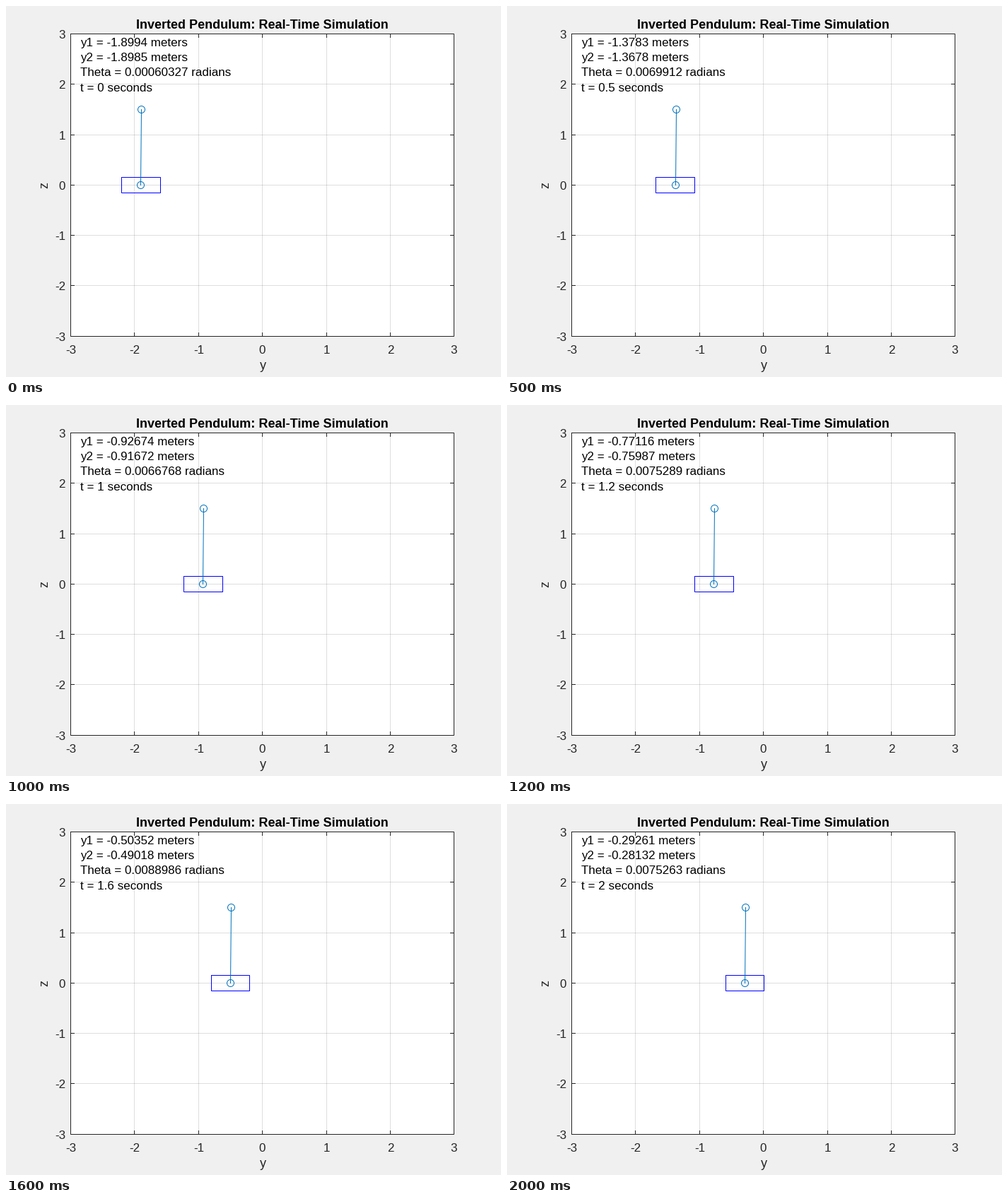
Animation, 700 px wide and 525 px high, one loop 2.1 s. Source, as a matplotlib script:

```python
import numpy as np
import matplotlib.pyplot as plt
from matplotlib.animation import FuncAnimation
from matplotlib.patches import Circle, Rectangle

W, H, DPI = 700, 525, 100
PX = 72 / DPI  # points per pixel
INK, BLUE = "#262626", "#0072BD"
FRAMES, DT = 21, 0.1
ROD = 1.5

# Sampled cart position and rod angle
T_CART = np.array([0, 0.3, 0.7, 1.0, 1.4, 1.8, 2.0])
CART = np.array([-1.8994, -1.5813, -1.1864, -0.92674,
                 -0.62991, -0.39129, -0.29261])
T_ANG = np.array([0, 0.1, 0.3, 0.7, 1.0, 1.4, 1.8, 2.0])
ANG = np.array([0.00060327, -0.00047218, 0.0047389, 0.0074275,
                0.0066768, 0.0085653, 0.0086265, 0.0075263])


def hermite(t, ts, vs):
    """Smooth curve through the samples."""
    slope = np.gradient(vs, ts)
    i = min(np.searchsorted(ts, t + 1e-9, side="right") - 1, len(ts) - 2)
    h = ts[i + 1] - ts[i]
    u = (t - ts[i]) / h
    a = u * u * (3 - 2 * u)
    return (vs[i] * (1 - a) + vs[i + 1] * a
            + h * u * (1 - u) * ((1 - u) * slope[i] - u * slope[i + 1]))


def sx(y):
    return np.rint(362.2 + 90.4167 * y) + 0.5


def sy(z):
    return np.rint(252.95 - 71.25 * z) + 0.5


fig = plt.figure(figsize=(W / DPI, H / DPI), dpi=DPI, facecolor="#f0f0f0")
ax = fig.add_axes([0, 0, 1, 1])
ax.set(xlim=(0, W), ylim=(H, 0))
ax.axis("off")


def line(xs, ys, color=INK, z=2, **kw):
    return ax.plot(xs, ys, color=color, lw=PX, zorder=z, snap=False, **kw)[0]


def label(x, y, s, size=17, color=INK, ha="center", **kw):
    kw.setdefault("va", "baseline")
    return ax.text(x, y, s, fontsize=size * PX, color=color, ha=ha,
                   family="Liberation Sans", zorder=5, **kw)


L, R, T, B = sx(-3), sx(3), sy(3), sy(-3)
ax.add_patch(Rectangle((L, T), R - L, B - T, fc="white", ec="none", zorder=0))
for v in range(-3, 4):
    x, y = sx(v), sy(v)
    if abs(v) < 3:
        line([x, x], [T, B], alpha=0.15, z=1)
        line([L, R], [y, y], alpha=0.15, z=1)
        for edge, d in ((T, 5.5), (B, -5.5)):
            line([x, x], [edge, edge + d], solid_capstyle="butt")
        for edge, d in ((L, 5.5), (R, -5.5)):
            line([edge, edge + d], [y, y], solid_capstyle="butt")
    label(x, 492, str(v))
    label(84, y + 6.5, str(v), ha="right")
line([L, R, R, L, L], [T, T, B, B, T], solid_joinstyle="miter")

label(362.5, 32, "Inverted Pendulum: Real-Time Simulation", 18, "black",
      weight="bold")
label(363.5, 514, "y", 18)
label(55, 253.5, "z", 18, rotation=90, va="center")

cart = line([], [], "#0000ff", 3, solid_joinstyle="miter")
rod = line([], [], BLUE, 4)
joints = [ax.add_patch(Circle((0, 0), 5, fill=False, ec=BLUE, lw=PX,
                              zorder=4, snap=False)) for _ in range(2)]
notes = [label(105, y, "", color="black", ha="left")
         for y in (57, 78, 99, 121)]


def update(i):
    t = i * DT
    y1 = hermite(t, T_CART, CART)
    theta = hermite(t, T_ANG, ANG)
    y2 = y1 + ROD * np.sin(theta)

    l, r, top, bottom = sx(y1 - 0.3), sx(y1 + 0.3), sy(0.15), sy(-0.15)
    cart.set_data([l, r, r, l, l], [top, top, bottom, bottom, top])
    xs, ys = [sx(y1), sx(y2)], [sy(0), sy(ROD * np.cos(theta))]
    rod.set_data(xs, ys)
    for joint, pos in zip(joints, zip(xs, ys)):
        joint.center = pos

    lines = (f"y1 = {y1:.5g} meters", f"y2 = {y2:.5g} meters",
             f"Theta = {theta:.5g} radians", f"t = {t:.4g} seconds")
    for note, s in zip(notes, lines):
        note.set_text(s)
    return [cart, rod, *joints, *notes]


anim = FuncAnimation(fig, update, frames=FRAMES, interval=1000 * DT,
                     repeat=True, repeat_delay=0, blit=False)
plt.show()
```
